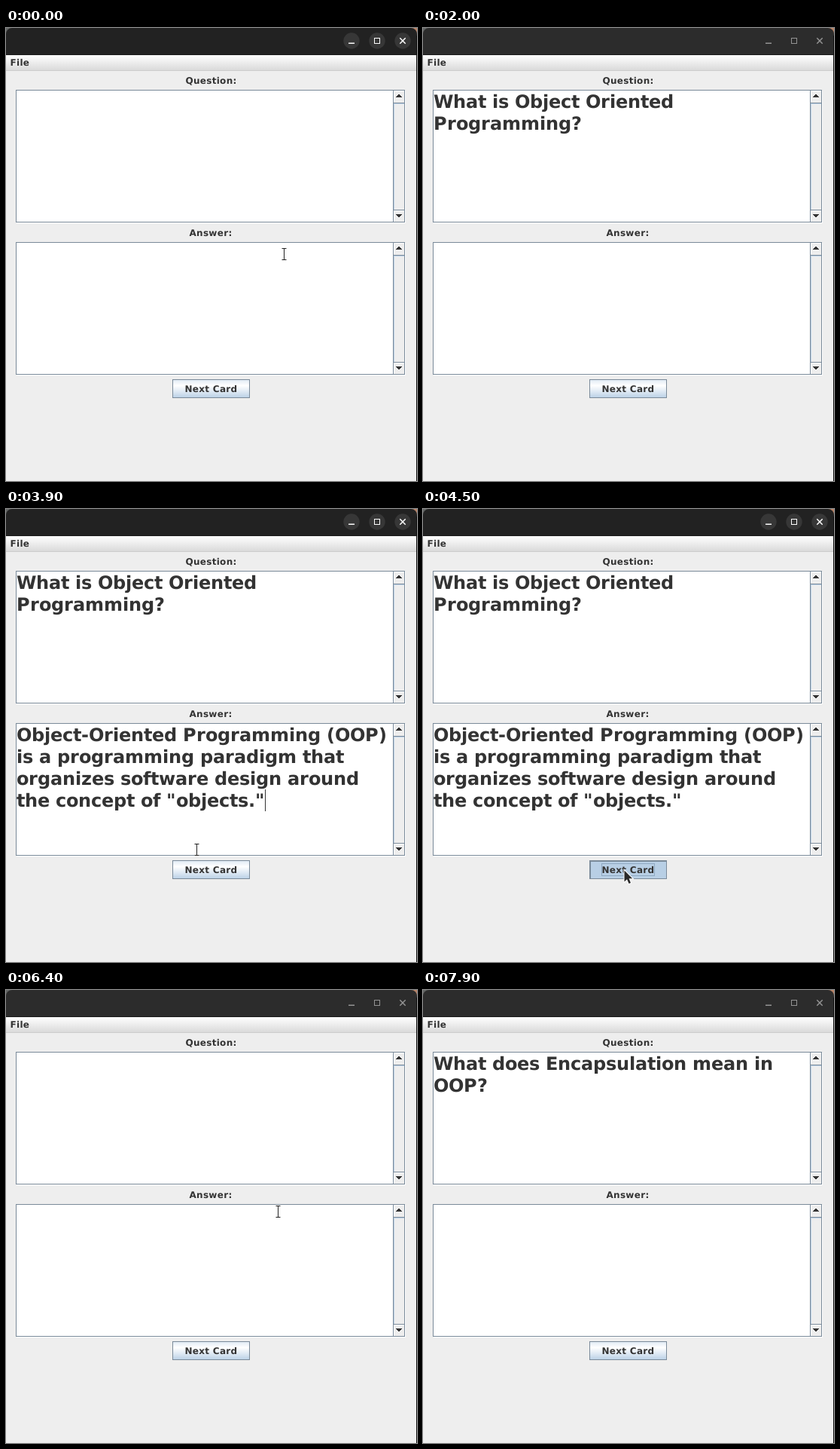
An HTML page with a canvas that plays this animation: 546 by 601 pixels, repeating every 8000 ms.

```html
<!DOCTYPE html>
<html lang="en">
<head>
<meta charset="utf-8">
<title>Flash cards</title>
<style>
html, body { margin: 0; width: 100%; height: 100%; overflow: hidden; background: #eee; }
canvas { display: block; }
</style>
</head>
<body>
<canvas id="stage" width="546" height="601"></canvas>
<script>
const ctx = document.getElementById('stage').getContext('2d');
ctx.textRendering = 'geometricPrecision';

const LOOP = 8000, STEP = 100, BLINK = 500, LINE = 29;
const INK = '#333', EDGE = '#7a8a99', PALE = '#b8cfe5', PANEL = '#eee';
const FONT = 'px "DejaVu Sans", sans-serif';
const BUTTON = { x: 221, y: 466, w: 103, h: 25 };
const FIELD = { x: 13, w: 517, h: 176, tops: { question: 82, answer: 284 } };

// Each step overrides part of the state; the caret blinks from the last step on.
const script = [
  { at: 0, question: '', answer: '', active: true, caret: null, pressed: false },
  { at: 600, caret: 'question' },
  { at: 1000, question: 'What is Object Oriented\nProgramming?' },
  { at: 2000, active: false },
  { at: 3400, active: true, caret: 'answer' },
  { at: 3900, answer: 'Object-Oriented Programming (OOP)\nis a programming paradigm that\n' +
    'organizes software design around\nthe concept of "objects."' },
  { at: 4400, caret: null, pressed: true },
  { at: 4600, question: '', answer: '', caret: 'question', pressed: false },
  { at: 5500, active: false },
  { at: 6700, active: true },
  { at: 7000, question: 'What does Encapsulation mean in\nOOP?' },
  { at: 7900, active: false }
];

// Pointer waypoints; x = 600 lies outside the stage.
const route = [
  { at: 0, x: 370, y: 300 }, { at: 1000, x: 266, y: 117 }, { at: 1100, x: 408, y: 224 },
  { at: 1200, x: 600, y: 350 }, { at: 3000, x: 600, y: 300 }, { at: 3700, x: 216, y: 348 },
  { at: 4100, x: 267, y: 487 }, { at: 4500, x: 267, y: 479 }, { at: 4600, x: 268, y: 479 },
  { at: 4800, x: 600, y: 300 }, { at: 6300, x: 600, y: 300 }, { at: 6400, x: 362, y: 294 },
  { at: 6900, x: 270, y: 140 }, { at: 7000, x: 420, y: 349 }, { at: 7100, x: 600, y: 480 }
];

const inside = (p, x, y, w, h) => p.x >= x && p.x < x + w && p.y >= y && p.y < y + h;

function stateAt(t) {
  return Object.assign({}, ...script.filter(s => s.at <= t));
}

function pointerAt(t) {
  const i = route.findLastIndex(p => p.at <= t);
  const a = route[i], b = route[i + 1] || a;
  const left = b === a ? 1 : (b.at - t) / (b.at - a.at);
  const mix = (from, to) => Math.round(to + (from - to) * left * left);
  return { x: mix(a.x, b.x), y: mix(a.y, b.y) };
}

function rect(x, y, w, h, color) {
  ctx.fillStyle = color;
  ctx.fillRect(x, y, w, h);
}

function frame(x, y, w, h, color) {
  ctx.strokeStyle = color;
  ctx.lineWidth = 1;
  ctx.strokeRect(x + .5, y + .5, w - 1, h - 1);
}

function shade(y, h, ...colors) {
  const g = ctx.createLinearGradient(0, y, 0, y + h);
  colors.forEach((c, i) => g.addColorStop(i / (colors.length - 1), c));
  return g;
}

function label(text, x, y, align = 'center') {
  ctx.font = 'bold 12' + FONT;
  ctx.letterSpacing = '.3px';
  ctx.textAlign = align;
  ctx.fillStyle = INK;
  ctx.fillText(text, x, y);
}

// Glyphs advance by whole pixels; returns where the line ends.
function line(text, x, y) {
  ctx.font = 'bold 24' + FONT;
  ctx.letterSpacing = '0px';
  ctx.textAlign = 'left';
  ctx.fillStyle = INK;
  for (const ch of text) {
    ctx.fillText(ch, x, y);
    x += Math.round(ctx.measureText(ch).width);
  }
  return x;
}

function titleBar(active) {
  rect(0, 0, 273, 12, '#646766');
  rect(273, 0, 273, 12, '#b9856a');
  ctx.beginPath();
  ctx.roundRect(0, 0, 546, 36, [8, 8, 0, 0]);
  ctx.fillStyle = active ? '#222' : '#2c2c2c';
  ctx.fill();
  rect(0, 35, 546, 1, '#1c1c1c');
  for (let x = 459; active && x < 546; x += 34) {
    ctx.beginPath();
    ctx.arc(x, 17, 10.7, 0, 7);
    ctx.fillStyle = '#373737';
    ctx.fill();
  }
  const glyph = active ? '#fff' : '#939393';
  rect(455, 19.5, 8, 1.5, glyph);
  frame(489, 13, 8, 8, glyph);
  ctx.lineWidth = 1.5;
  ctx.beginPath();
  for (const side of [-3.7, 3.7]) {
    ctx.moveTo(527 - side, 13.3);
    ctx.lineTo(527 + side, 20.7);
  }
  ctx.stroke();
}

function scrollButton(y, arrowY, up) {
  rect(515, y, 14, 16, PANEL);
  rect(515, y, 14, 1, '#fff');
  rect(515, y, 1, 15, '#fff');
  for (let row = 0; row < 4; row++) {
    const half = up ? row : 3 - row;
    rect(521 - half, arrowY + row, 2 + 2 * half, 1, INK);
  }
}

function field(top, text, caretOn) {
  const { x, w, h } = FIELD;
  rect(x + 1, top + 1, w, h, '#fff');
  rect(514, top + 1, 15, h - 2, PANEL);
  scrollButton(top + 1, top + 6, true);
  scrollButton(top + 160, top + 165, false);
  frame(514, top + 17, 16, 143, EDGE);
  rect(515, top + 18, 1, 141, PALE);
  rect(515, top + 18, 14, 1, PALE);
  rect(514, top, 1, h, EDGE);
  frame(x, top, w, h, EDGE);

  let end = 14, row = 0;
  text.split('\n').forEach((s, i) => {
    end = line(s, 14, top + 24 + i * LINE);
    row = i;
  });
  if (caretOn) rect(end, top + 1 + row * LINE, 1, LINE, INK);
}

function nextButton(hover, pressed) {
  const { x, y, w, h } = BUTTON;
  rect(x, y, w, h, pressed ? PALE : shade(y, h, '#dde8f3', '#fff', '#dde8f3', PALE));
  frame(x, y, w, h, hover && !pressed ? PALE : EDGE);
  if (pressed) {
    rect(x + 1, y + 1, w - 2, 1, EDGE);
    rect(x + 1, y + 1, 1, h - 2, EDGE);
    frame(237, 470, 71, 17, '#8fa9c2');
  } else if (hover) {
    frame(x + 1, y + 1, w - 2, h - 2, '#6382bf');
    frame(x + 2, y + 2, w - 4, h - 4, PALE);
  }
  label('Next Card', 272.5, 483);
}

function outline(path, width, color) {
  ctx.lineWidth = width;
  ctx.strokeStyle = color;
  ctx.stroke(path);
}

function drawPointer(p) {
  const overText = Object.values(FIELD.tops).some(top => inside(p, 14, top + 1, 500, FIELD.h));
  ctx.save();
  ctx.translate(p.x, p.y);
  if (overText) {
    const beam = new Path2D('M-3.5-7.5h6M-3.5 7.5h6M-.5-7v14');
    outline(beam, 3, '#fff');
    outline(beam, 1, '#222');
  } else {
    const arrow = new Path2D('M.5.5v15l3.5-3.2 2.5 5.7 2.5-1-2.4-5.7h4.6z');
    outline(arrow, 2, '#fff');
    ctx.fillStyle = '#2a2a2a';
    ctx.fill(arrow);
  }
  ctx.restore();
}

function draw(t) {
  const state = stateAt(t), pointer = pointerAt(t);
  const { x, y, w, h } = BUTTON;
  const blinkOn = state.active && (t - state.at) % (2 * BLINK) < BLINK;

  rect(0, 0, 546, 601, PANEL);
  titleBar(state.active);
  rect(0, 36, 546, 20, shade(36, 20, '#fff', '#dadada'));
  rect(0, 56, 546, 1, '#ccc');
  label('File', 5.5, 50, 'left');
  label('Question:', 272.5, 74);
  label('Answer:', 272, 276);
  for (const [name, top] of Object.entries(FIELD.tops)) {
    field(top, state[name], blinkOn && state.caret === name);
  }
  nextButton(inside(pointer, x, y, w, h), state.pressed);
  rect(545, 10, 1, 591, '#111');
  drawPointer(pointer);
}

function tick() {
  draw(Math.floor(performance.now() % LOOP / STEP) * STEP);
  requestAnimationFrame(tick);
}
tick();
</script>
</body>
</html>
```
